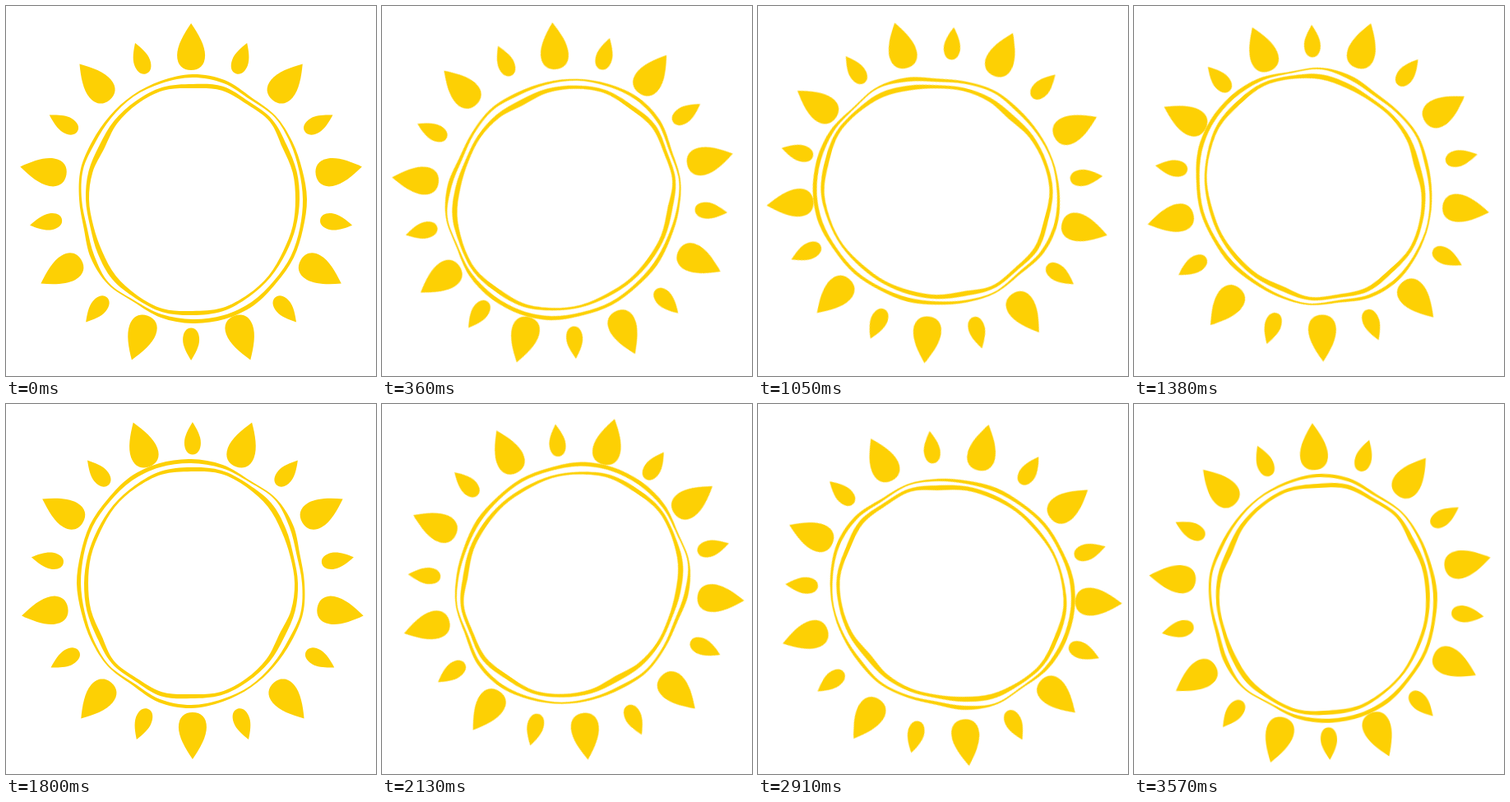
An HTML page that plays this animation: 450 by 450 pixels, repeating every 3600 ms.

```html
<!DOCTYPE html>
<html lang="en">
<head>
<meta charset="utf-8">
<title>Spinning sun</title>
<style>
  html, body { margin: 0; width: 100%; height: 100%; overflow: hidden; background: #fff; }
  svg { display: block; width: 450px; height: 450px; }
  #sun { fill: #fdd004; transform-origin: 226px 226.5px; }
</style>
</head>
<body>
<svg viewBox="0 0 450 450">
  <defs>
    <path id="big" d="M0-211C9-198 17-184 17-172C17-160 10-154 0-154S-17-160-17-172C-17-184-9-198 0-211Z"/>
    <path id="small" d="M0-199C5-191 10-182 10-174C10-165 6-159.500 0-159.500S-10-165-10-174C-10-182-5-191 0-199Z"/>
  </defs>
  <g id="sun">
    <g id="rays" transform="translate(225.1 232.1)"></g>
    <path id="ring" fill-rule="evenodd"/>
  </g>
</svg>
<script>
const LOOP = 3600, STEPS = 120, HALF = 60;
const sun = document.getElementById('sun');

// Rays: nine large and nine small, alternating
const rays = document.getElementById('rays');
for (let i = 0; i < 18; i++) {
  const ray = document.createElementNS('http://www.w3.org/2000/svg', 'use');
  ray.setAttribute('href', i % 2 ? '#small' : '#big');
  ray.setAttribute('transform', `rotate(${i * 20})`);
  rays.append(ray);
}

// Hand-drawn double ring: radii and line widths every 15 degrees, clockwise from the top
const outer = [152, 150, 143, 143, 140, 138, 139, 139, 142, 144, 149, 151,
               151, 149, 144, 146, 143, 137, 138, 141, 141, 143, 146, 149];
const inner = [135, 137, 133, 133, 126, 126, 125, 126, 127, 131, 134, 137,
               136, 138, 135, 132, 127, 125, 126, 126, 124, 130, 134, 137];
const outerWidth = [...'443234544455542254334323'].map(Number);
const innerWidth = [...'554465544334544664457544'].map(Number);

function closedCurve(radii) {
  const n = radii.length;
  const pts = radii.map((r, i) => {
    const a = i / n * 2 * Math.PI;
    return [227 + r * Math.sin(a), 235 - r * Math.cos(a)];
  });
  const at = i => pts[(i + n) % n];
  const fmt = p => p.map(v => v.toFixed(2)).join(' ');
  const handle = (i, side) => at(i).map((v, k) => v + side * (at(i + 1)[k] - at(i - 1)[k]) / 6);
  let d = 'M' + fmt(at(0));
  for (let i = 0; i < n; i++) {
    d += 'C' + [handle(i, 1), handle(i + 1, -1), at(i + 1)].map(fmt).join(' ');
  }
  return d + 'Z';
}

document.getElementById('ring').setAttribute('d', [
  outer,
  outer.map((r, i) => r - outerWidth[i]),
  inner.map((r, i) => r + innerWidth[i]),
  inner
].map(closedCurve).join(''));

// Even first half turn, then a slightly eased second half with a small drift
function pose(i) {
  if (i <= HALF) return `translate(0px, 0px) rotate(${i * 3}deg)`;
  const p = (i - HALF) / (STEPS - 1 - HALF);
  const angle = 180 + 177 * (p + 0.055 * p * (1 - p));
  const drift = p ** 1.4;
  return `translate(${2.5 * drift}px, ${2 * drift}px) rotate(${angle}deg)`;
}

const frames = Array.from({ length: STEPS + 1 }, (_, i) => ({
  offset: i / STEPS,
  transform: pose(Math.min(i, STEPS - 1)),
  easing: 'steps(1, end)'
}));
sun.animate(frames, { duration: LOOP, iterations: Infinity });
</script>
</body>
</html>
```
